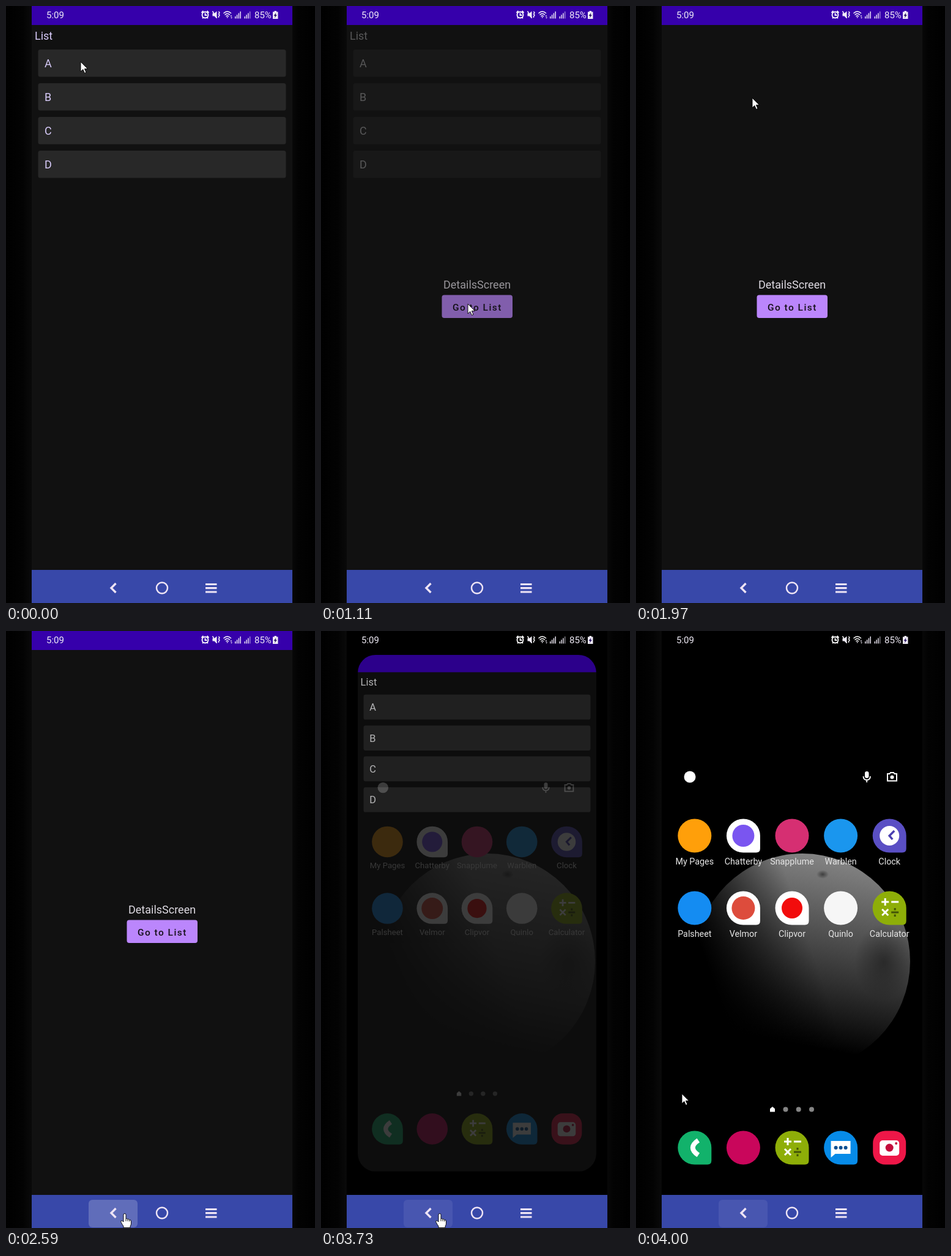
These frames come from a looping animation (505 px wide and 974 px high, 4.05 s). An HTML page:

```html
<!DOCTYPE html>
<html lang="en">
<head>
<meta charset="utf-8">
<title>List and details navigation</title>
<style>
  html, body { margin: 0; width: 100%; height: 100%; overflow: hidden; background: #000; }
  svg { display: block; width: 100vw; height: 100vh; font-family: Roboto, sans-serif; }
  .line { fill: none; stroke: #fff; }
</style>
</head>
<body>
<svg viewBox="0 0 505 974">
  <defs>
    <linearGradient id="edge">
      <stop offset="0" stop-color="#000"/><stop offset=".055" stop-color="#030303"/>
      <stop offset=".08" stop-color="#090909"/><stop offset=".92" stop-color="#090909"/>
      <stop offset=".945" stop-color="#030303"/><stop offset="1" stop-color="#000"/>
    </linearGradient>
    <linearGradient id="moonLight" gradientUnits="userSpaceOnUse" x1="325" y1="366" x2="262" y2="690">
      <stop offset="0" stop-color="#858585"/><stop offset=".3" stop-color="#5c5c5c"/>
      <stop offset=".62" stop-color="#303030"/><stop offset=".95" stop-color="#000"/>
    </linearGradient>
    <linearGradient id="moonShade" gradientUnits="userSpaceOnUse" x1="105" y1="510" x2="265" y2="455">
      <stop offset="0" stop-color="#000"/><stop offset="1" stop-color="#000" stop-opacity="0"/>
    </linearGradient>
    <radialGradient id="crater">
      <stop offset="0" stop-color="#181818" stop-opacity=".6"/><stop offset="1" stop-color="#181818" stop-opacity="0"/>
    </radialGradient>
    <clipPath id="windowClip"><rect id="windowShape" x="42" y="0" width="426" height="921"/></clipPath>
    <clipPath id="backClip"><rect x="135" y="928" width="80" height="45" rx="6"/></clipPath>
    <path id="tile" d="M-27.5 0a27.5 27.5 0 0 1 55 0v21q0 6.500-6.500 6.500H0A27.500 27.500 0 0 1-27.500 0z"/>
  </defs>

  <rect width="505" height="974" fill="url(#edge)"/>
  <rect x="42" width="426" height="921"/>

  <circle cx="272" cy="539" r="176" fill="url(#moonLight)"/>
  <ellipse cx="405" cy="540" rx="48" ry="62" fill="url(#crater)"/>
  <ellipse cx="305" cy="397" rx="10" ry="7" fill="url(#crater)"/>
  <circle cx="272" cy="539" r="177" fill="url(#moonShade)"/>
  <g id="launcher" fill="#fff"></g>

  <g id="window" clip-path="url(#windowClip)">
    <rect x="42" width="426" height="921" fill="#111"/>
    <rect x="42" width="426" height="31" fill="#3600ab"/>
    <g id="list" font-size="18"></g>
    <g id="details">
      <text x="200" y="461" font-size="18" fill="#dedae2">DetailsScreen</text>
      <rect x="197.500" y="471.500" width="115.500" height="37.500" rx="4" fill="#bb86fc"/>
      <text x="215" y="496.500" font-size="15.500" font-weight="500" letter-spacing="1.45" fill="#141018">Go to List</text>
    </g>
  </g>

  <g fill="#f1edf8" font-size="15">
    <text x="66" y="20">5:09</text>
    <text x="406" y="20">85%</text>
    <g class="line" stroke-width="1.800">
      <circle cx="325.500" cy="14.500" r="5"/>
      <path d="M325.500 11.500v3.500h3M319.500 11l3-3M331.500 11l-3-3M321 20l1.500-1.500M330 20l-1.500-1.500"/>
      <path d="M337.500 8.500l7 11M347.500 9l1.500 2-1.500 2 1.500 2-1.500 2v2" stroke-width="1.400"/>
      <path d="M355.500 12q6-6 12.500 0M357.500 14.500q4-4 8.500 0M359.500 17q2-2 4.500 0" stroke-width="1.300"/>
    </g>
    <path d="M337.500 12h3l4-3.500v12l-4-4h-3zM360.500 18h2.500l-1.200 2zM366.500 17l1.500-2 1.500 2zM367 18.500h3l-1.500 2z"/>
    <g id="signals"></g>
    <path d="M438.500 8h3.500v1.500h2.500v11.500h-8.500V9.500h2.500z"/>
    <path d="M441.500 11l-4 5h2.300l-.8 3.500 4-5h-2.300z" fill="#251060"/>
  </g>

  <rect x="42" y="920" width="426" height="54" fill="#3848a9"/>
  <rect id="hover" x="135" y="928" width="80" height="45" rx="6" fill="#fff"/>
  <g class="line" style="stroke:#eee4f5">
    <path d="M179.500 942l-7.500 7.500 7.500 7.500" stroke-width="3.400"/>
    <circle cx="255" cy="949.500" r="9" stroke-width="2.500"/>
    <path d="M326 943.500h18.500M326 949.700h18.500M326 956h18.500" stroke-width="3.200"/>
  </g>
  <g clip-path="url(#backClip)"><circle id="ripple" cx="191" cy="951" fill="#fff"/></g>
  <g id="tooltip">
    <rect x="158" y="936" width="35" height="17.500" rx="2.500" fill="#616161" fill-opacity=".95"/>
    <text x="175.500" y="947.300" font-size="8.300" text-anchor="middle" fill="#fff">Back</text>
  </g>

  <g id="cursor" fill="#fff" stroke="#000" stroke-width=".9" stroke-linejoin="round">
    <path id="arrow" d="M0 0V16L3.800 12.500 6.500 18.500 9 17.400 6.400 11.600H11.500z"/>
    <path id="hand" d="M-2 1.500Q-2-.5 0-.5t2 2V8q2-1 3 .8 2-.8 2.800 1 2.700-.5 2.700 2.200v4q0 2-1.500 4v2.500H-2v-2.500q-2-2.500-4-6.500-1-2.500 1.500-2.500L-2 13zM2 8v4M5 9v3M7.800 10v2.500"/>
  </g>
</svg>

<script>
const LOOP = 4050;
const $ = id => document.getElementById(id);

// Bursts of screen updates: first update, last update, number of updates.
const bursts = [
  [110, 290, 4], [450, 880, 8], [1050, 1270, 5], [1510, 2020, 10], [2080, 2590, 10],
  [2650, 2710, 2], [2850, 3350, 9], [3410, 3880, 9], [3940, 4000, 2]
];

// Rows of [time, values...], interpolated linearly.
const tracks = {
  cursor: [[110, 122, 91], [170, 128, 75], [230, 111, 79], [290, 126, 89], [696, 126, 89],
    [880, 240, 486], [1270, 240, 486], [1510, 205, 174], [1624, 190, 150], [2080, 190, 150],
    [2520, 194, 951], [3880, 194, 951], [4000, 75, 755]],
  details: [[450, 0], [511, .15], [634, .85], [690, 1], [1020, 1], [1270, 0],
    [1680, 0], [1960, 1], [2630, 1], [2900, 0]],
  press: [[440, 0], [450, .08], [511, .12], [690, 0], [1600, 0], [1680, .12], [1900, 0]],
  hover: [[2470, 0], [2570, .2], [2710, .2], [2900, .08]],
  ripple: [[2630, 5, 0], [2650, 15, .25], [2710, 43, .27], [2850, 70, .2], [3000, 80, 0],
    [3200, 0, 0], [3230, 10, .25], [3350, 43, .27], [3470, 75, .2], [3590, 90, 0]],
  tooltip: [[3100, 0], [3225, 1], [3410, 1], [3590, 0]],
  window: [[3580, 1, 1, 0], [3645, .96, .96, 28], [3703, .9155, .82, 32],
    [3762, .9, .5, 33], [3880, .89, .08, 33], [3940, .89, 0, 33]],
  launcher: [[3703, .92], [3880, .98], [4000, 1]]
};

function sample(rows, t) {
  const next = rows.findIndex(row => row[0] > t);
  if (next === 0) return rows[0].slice(1);
  if (next < 0) return rows[rows.length - 1].slice(1);
  const a = rows[next - 1], b = rows[next];
  const k = (t - a[0]) / (b[0] - a[0]);
  return a.slice(1).map((v, i) => v + (b[i + 1] - v) * k);
}

// Holds the screen between updates, as a screen recording does.
function snap(t) {
  let held = 0;
  for (const [start, end, count] of bursts) {
    if (t < start) break;
    const step = (end - start) / (count - 1);
    held = Math.min(end, start + Math.floor((t - start + 12) / step) * step);
  }
  return held;
}

const cardTop = i => 71 + 55 * i;

function buildList() {
  const cards = ['A', 'B', 'C', 'D'].map((name, i) => `
    <rect x="52.5" y="${cardTop(i)}" width="405" height="44.500" rx="3.500" fill="#282828"/>
    <text x="63" y="${cardTop(i) + 29}">${name}</text>`).join('');
  $('list').innerHTML = `<text x="47" y="55">List</text>${cards}
    <rect id="press" x="52.500" width="405" height="44.500" rx="3.500" fill="#fff"/>`;
}

function buildSignals() {
  let bars = '';
  for (const x of [374, 389.5])
    for (let i = 0; i < 4; i++)
      bars += `<rect x="${x + i * 2.8}" y="${17 - i * 2.7}" width="1.600" height="${3.5 + i * 2.7}" opacity="${x > 380 && i > 2 ? .5 : .9}"/>`;
  $('signals').innerHTML = bars;
}

function buildLauncher() {
  const disc = (r, color) => `<circle r="${r}" fill="${color}"/>`;
  const tile = (color, glyph = '') => `<use href="#tile" fill="${color}"/>${glyph}`;
  const lines = (d, width, color = '#fff') => `<path d="${d}" fill="none" stroke="${color}" stroke-width="${width}"/>`;
  const calculator = tile('#8eae08', lines('M-13-10h12M-7-16v12M3-10h12M-12 2l10 10M-2 2l-10 10', 3) +
    lines('M3 7h12M9 0v3.500M9 10.500v3.500', 3, '#435407'));
  const rows = [
    [334, [
      ['My Pages', disc(27.5, '#ff9f0a')],
      ['Chatterby', tile('#fff', disc(18, '#7a55f0'))],
      ['Snapplume', disc(27.5, '#d62f72')],
      ['Warblen', disc(27.5, '#1a96ee')],
      ['Clock', tile('#5a4fc4', disc(16, '#fff') + lines('M8-8L0 0l5 6', 3.5, '#4a3fb0'))]
    ]],
    [452, [
      ['Palsheet', disc(27.5, '#148cf2')],
      ['Velmor', tile('#fff', disc(19, '#dd4c3c'))],
      ['Clipvor', tile('#fff', disc(17, '#f20c0c'))],
      ['Quinlo', disc(27.5, '#f6f6f6')],
      ['Calculator', calculator]
    ]],
    [843, [
      ['', tile('#12b26b', lines('M6-12Q-12 0 6 12', 8))],
      ['', disc(27.5, '#c9065b')],
      ['', calculator],
      ['', tile('#078be8', '<path d="M-16-11h32v21h-25l-7 6z"/>' +
        [-8, 0, 8].map(x => `<circle cx="${x}" r="3" fill="#0b4f91"/>`).join(''))],
      ['', '<rect x="-27" y="-27.500" width="54" height="55" rx="20" fill="#ee1748"/>' +
        '<rect x="-16" y="-12" width="32" height="25" rx="5"/>' + disc(6.5, '#c30b3b') +
        '<circle cx="11" cy="-7" r="2" fill="#c30b3b"/>']
    ]]
  ];
  const icons = rows.map(([y, apps]) => apps.map(([name, art], i) => `
    <g transform="translate(${95.8 + 79.6 * i} ${y})">${art}
      <text y="47" font-size="14.300" text-anchor="middle" fill="#e6e6e6">${name}</text></g>`).join('')).join('');
  const dots = [244.5, 265.7, 287].map(x => `<circle cx="${x}" cy="780.500" r="4" fill="#858585"/>`).join('');
  $('launcher').innerHTML = `<circle cx="88" cy="238" r="9.500"/>
    <rect x="374" y="229" width="6.500" height="11" rx="3.200"/>
    ${lines('M371.500 237q0 6 5.700 6t5.700-6M377.200 243v4', 1.8)}
    ${lines('M411 233h3.500l1.500-2h5l1.500 2h3.500v11.500h-15z', 2)}
    <circle cx="418.500" cy="238.500" r="3"/>
    ${icons}<path d="M223 776l4 3.500v5h-8v-5z"/>${dots}`;
}

const scaleAbout = s => `translate(255 459) scale(${s}) translate(-255 -459)`;

function render(t) {
  const at = name => sample(tracks[name], t);
  const fade = (id, value) => $(id).setAttribute('opacity', value);

  const [details] = at('details');
  fade('details', details);
  fade('list', 1 - details);
  $('list').setAttribute('fill', t < 450 ? '#d9ccfb' : '#dedee0');
  $('press').setAttribute('y', cardTop(t < 1400 ? 0 : 1));
  fade('press', at('press')[0]);

  const [scale, alpha, radius] = at('window');
  $('window').setAttribute('transform', scaleAbout(scale));
  fade('window', alpha);
  $('windowShape').setAttribute('rx', radius);
  $('launcher').setAttribute('transform', scaleAbout(at('launcher')[0]));

  const [rippleRadius, rippleAlpha] = at('ripple');
  $('ripple').setAttribute('r', rippleRadius);
  fade('ripple', rippleAlpha);
  fade('hover', at('hover')[0]);
  fade('tooltip', at('tooltip')[0]);

  const [x, y] = at('cursor');
  const pointing = y > 925;
  $('cursor').setAttribute('transform', `translate(${x} ${y})`);
  fade('arrow', pointing ? 0 : 1);
  fade('hand', pointing ? 1 : 0);
}

buildList();
buildSignals();
buildLauncher();
const begin = performance.now();
function tick() {
  render(snap((performance.now() - begin) % LOOP));
  requestAnimationFrame(tick);
}
tick();
</script>
</body>
</html>
```
